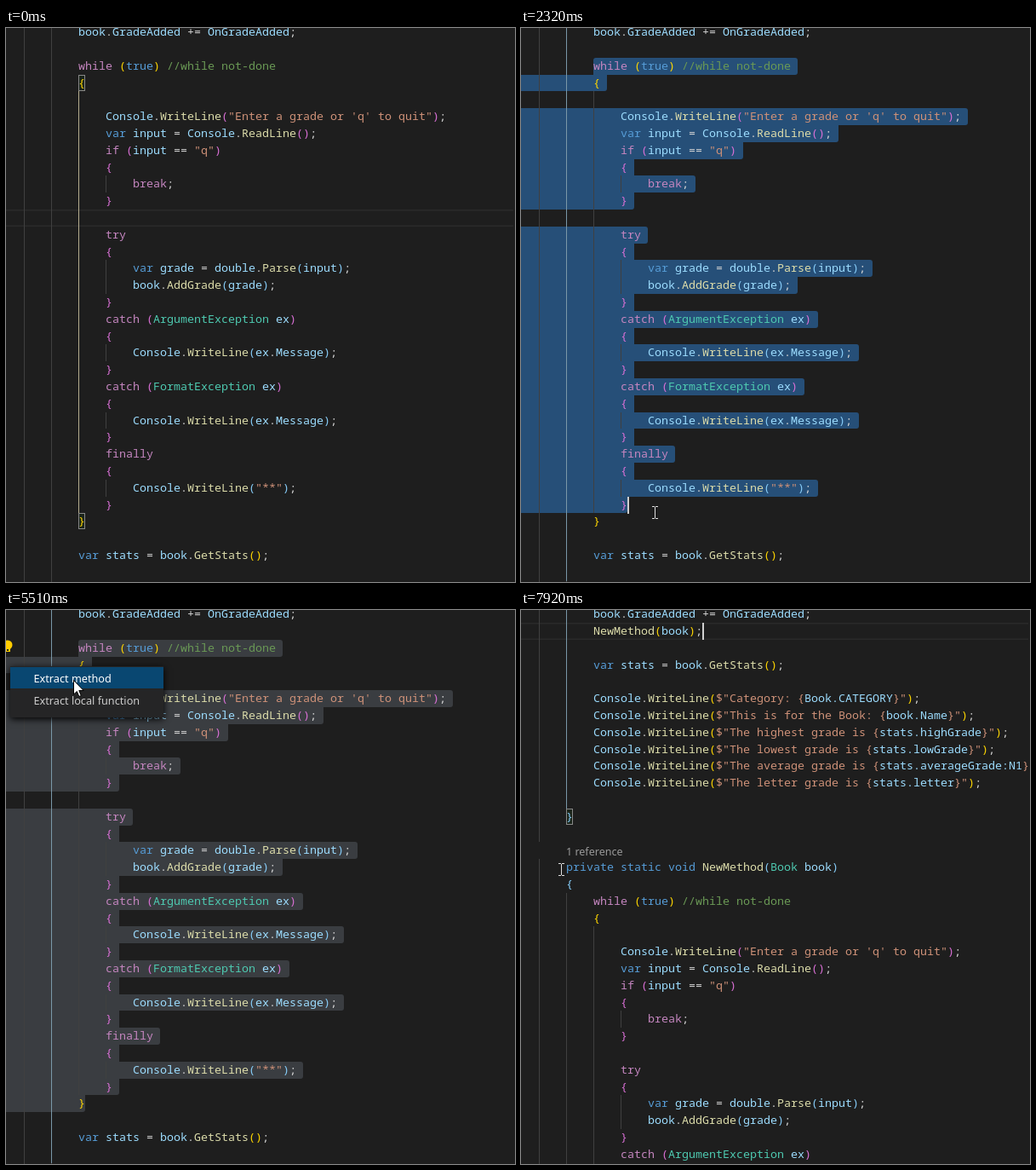
Recreate the animation shown at these times as an HTML page with a canvas. Size 598x650 px, loop 7.99 s.

```html
<!DOCTYPE html>
<html lang="en">
<head>
<meta charset="utf-8">
<title>Extract method</title>
<style>
  html, body { margin: 0; width: 100%; height: 100%; overflow: hidden; background: #1e1e1e; }
  canvas { display: block; }
</style>
</head>
<body>
<canvas id="stage" width="598" height="650"></canvas>
<script>
const ctx = document.getElementById("stage").getContext("2d");
const LOOP = 7990, TICK = 76.76, TICK_ORIGIN = 1530;
const LEFT = 21, CHAR = 8, LINE = 19.8;
const CODE_FONT = '13.333px "Noto Sans Mono", monospace';
const uiFont = size => `${size}px "Noto Sans", sans-serif`;

const loopCode = `        while (true) //while not-done
        {

            Console.WriteLine("Enter a grade or 'q' to quit");
            var input = Console.ReadLine();
            if (input == "q")
            {
                break;
            }

            try
            {
                var grade = double.Parse(input);
                book.AddGrade(grade);
            }
            catch (ArgumentException ex)
            {
                Console.WriteLine(ex.Message);
            }
            catch (FormatException ex)
            {
                Console.WriteLine(ex.Message);
            }
            finally
            {
                Console.WriteLine("**");
            }
        }`.split("\n");
const report = `        var stats = book.GetStats();

        Console.WriteLine($"Category: {Book.CATEGORY}");
        Console.WriteLine($"This is for the Book: {book.Name}");
        Console.WriteLine($"The highest grade is {stats.highGrade}");
        Console.WriteLine($"The lowest grade is {stats.lowGrade}");
        Console.WriteLine($"The average grade is {stats.averageGrade:N1}");
        Console.WriteLine($"The letter grade is {stats.letter}");`.split("\n");
const firstLine = "        book.GradeAdded += OnGradeAdded;";
const upperCode = [firstLine, "        NewMethod(book);", "", ...report, "", "    }", ""];
const methodCode = ["    private static void NewMethod(Book book)", "    {", ...loopCode];

const original = makeDoc([firstLine, "", ...loopCode, "", ...report]);
const extracted = makeDoc([...upperCode, ...methodCode]);
const withLens = makeDoc([...upperCode, null, ...methodCode]);   // null leaves room for the code lens

function wordColor(word, rest) {
  if (/^(while|if|break|try|catch|finally)$/.test(word)) return "#c586c0";
  if (/^(var|true|private|static|void)$/.test(word)) return "#569cd6";
  if (/Exception$/.test(word) || (word === "Book" && rest[0] === " ")) return "#4ec9b0";
  return rest[0] === "(" ? "#dcdcaa" : "#9cdcfe";
}

function makeDoc(lines) {
  const brackets = ["#ffd700", "#da70d6", "#87cefa"];
  let depth = 3;
  const tokens = lines.map(line => {
    const out = [];
    const add = (col, text, color) => out.push({ x: LEFT + col * CHAR, text, color });
    for (const m of (line || "").matchAll(/\/\/.*|\$?"[^"]*"|\w+|[(){}]|[^\s\w(){}"]+/g)) {
      const text = m[0];
      if (text.startsWith("//")) add(m.index, text, "#6a9955");
      else if (/^\$?"/.test(text)) {
        for (const p of text.matchAll(/[^{}]+|[{}]/g))
          add(m.index + p.index, p[0], text[p.index - 1] === "{" ? "#9cdcfe" : "#ce9178");
      }
      else if (/^\w/.test(text)) add(m.index, text, wordColor(text, line.slice(m.index + text.length)));
      else if (/[({]/.test(text)) add(m.index, text, brackets[depth++ % 3]);
      else if (/[)}]/.test(text)) add(m.index, text, brackets[--depth % 3]);
      else add(m.index, text, "#d4d4d4");
    }
    return out;
  });
  // Blank lines take the deeper indent of their neighbours
  const indentNear = (i, step) => {
    while (lines[i] !== undefined && !lines[i]) i += step;
    return lines[i] ? lines[i].search(/\S/) : 0;
  };
  const indents = lines.map((line, i) =>
    line === null ? 0 : Math.max(indentNear(i, -1), indentNear(i, 1)));
  return { lines, tokens, indents };
}

// Pointer path: time, x, y
const path = [
  [70, 331, 489], [610, 61, 58], [730, 61, 58], [1080, 84, 43], [1380, 84, 43],
  [1453, 125, 143], [1530, 139, 183], [1850, 150, 410], [2170, 157, 558], [2290, 157, 568],
  [2400, 157, 568], [2450, 158, 573], [2600, 161, 578], [2900, 161, 578], [2980, 167, 560],
  [3240, 6, 79], [3400, 6, 79], [3560, 5, 44], [4950, 5, 44], [5270, 79, 82],
  [6190, 79, 82], [6519, 272, 274], [6980, 150, 311], [7740, 47, 304], [LOOP, 47, 304]
];
function pointerAt(t) {
  const i = path.findIndex(p => p[0] > t);
  if (i < 1) return { x: path[0][1], y: path[0][2] };
  const [t0, x0, y0] = path[i - 1], [t1, x1, y1] = path[i], k = (t - t0) / (t1 - t0);
  return { x: x0 + (x1 - x0) * k, y: y0 + (y1 - y0) * k };
}

const lineTop = i => Math.round(i * LINE - 4.8);
const endOf = line => LEFT + line.length * CHAR - (line ? 0 : 32);
function rect(color, x, y, w, h) {
  ctx.fillStyle = color;
  ctx.fillRect(x, y, w, h);
}
function label(text, x, y, size, color) {
  ctx.font = uiFont(size);
  ctx.fillStyle = color;
  ctx.fillText(text, x, y);
}

function drawSelection(caret, color) {
  const right = i => i < 2 || i > caret.line ? 0
    : i === caret.line ? caret.x : endOf(original.lines[i]) + CHAR;
  ctx.fillStyle = color;
  for (let i = 2; i <= caret.line; i++) {
    const left = i === 2 ? 85 : 0, r = right(i);
    if (r <= left) continue;
    ctx.beginPath();
    ctx.roundRect(left, lineTop(i), r - left, lineTop(i + 1) - lineTop(i), [
      i === 2 ? 3 : 0, right(i - 1) < r ? 3 : 0, right(i + 1) < r ? 3 : 0, 0]);
    ctx.fill();
  }
}

function drawGuides(doc, active) {
  doc.indents.forEach((indent, i) => {
    for (let col = 0; col < indent; col += 4)
      rect("#404040", LEFT + col * CHAR, lineTop(i), 1, lineTop(i + 1) - lineTop(i));
  });
  const y = lineTop(active.from);
  rect(active.color, LEFT + active.col * CHAR, y, 1, lineTop(active.to) - y);
}

function drawBracketBox(col, line) {
  const x = LEFT + col * CHAR, y = lineTop(line);
  rect("rgba(0,100,0,.1)", x, y, CHAR, 19);
  ctx.strokeStyle = "#888";
  ctx.lineWidth = 1;
  ctx.strokeRect(x + .5, y + .5, CHAR - 1, 18);
}

function drawCode(doc) {
  ctx.font = CODE_FONT;
  doc.tokens.forEach((row, i) => {
    const y = Math.round(i * LINE + 9.2);
    for (const { x, text, color } of row) {
      ctx.fillStyle = color;
      ctx.fillText(text, x, y);
    }
  });
}

function drawBulb() {
  ctx.fillStyle = "#ffcc00";
  ctx.beginPath();
  ctx.arc(2, 41, 5.5, 0, 7);
  ctx.fill();
  rect("#ffcc00", -1, 45, 6, 4);
  rect("#1e1e1e", 1, 46, 2, 2);
}

function drawTooltip() {
  rect("#454545", 4, 68, 135, 24);
  rect("#252526", 5, 69, 133, 22);
  label("Show Fixes. (Ctrl+.)", 12, 84, 12, "#ccc");
}

function drawMenu(alpha) {
  ctx.save();
  ctx.globalAlpha = alpha;
  ctx.shadowColor = "#000";
  ctx.shadowBlur = 8;
  ctx.shadowOffsetY = 2;
  rect("#252526", 5, 66, 180, 60);
  ctx.shadowColor = "transparent";
  rect("#094771", 5, 67, 180, 25);
  label("Extract method", 32.5, 85, 12.7, "#fff");
  label("Extract local function", 32.5, 111, 12.7, "#ccc");
  ctx.restore();
}

function drawPointer({ x, y }, arrow) {
  ctx.save();
  ctx.translate(Math.round(x) + .5, Math.round(y) + .5);
  ctx.lineWidth = 1;
  if (arrow) {
    const shape = new Path2D("M0 0V16.5L3.8 13 6.3 19 8.8 18 6.3 12H11.6Z");
    ctx.fillStyle = "#fff";
    ctx.strokeStyle = "#000";
    ctx.fill(shape);
    ctx.stroke(shape);
  } else {
    ctx.strokeStyle = "#e0e0e0";
    ctx.stroke(new Path2D("M-3.5 -7H-.5M.5 -7H3.5M0 -6.5V6.5M-3.5 7H-.5M.5 7H3.5"));
  }
  ctx.restore();
}

function draw(t) {
  const tick = TICK_ORIGIN + Math.floor((t - TICK_ORIGIN) / TICK) * TICK;
  const done = t >= 5980, selecting = t >= 1390 && !done;
  const menu = t >= 4440 && t < 5910;
  const doc = !done ? original : t < 6200 ? extracted : withLens;

  rect("#1e1e1e", 0, 0, 598, 650);
  if (!selecting) {
    const line = done ? 1 : 11;
    rect("#2a2a2a", 0, lineTop(line), 596, 1.5);
    rect("#2a2a2a", 0, lineTop(line + 1) - 1.5, 596, 1.5);
  }

  // The caret trails the pointer by one tick while dragging
  const caret = { line: 1, x: 213 };
  if (selecting) {
    const p = pointerAt(Math.min(tick, 2610) - TICK);
    caret.line = Math.floor((p.y + 4.8) / LINE);
    const col = Math.max(0, Math.round((p.x - 85) / CHAR));
    caret.x = Math.min(endOf(original.lines[caret.line]), 85 + col * CHAR);
    drawSelection(caret, menu ? "#3a3d41" : "#264f78");
  }

  drawGuides(doc, t < 1390 ? { col: 8, from: 4, to: 29, color: "#b5ad8f" }
    : { col: 4, from: 0, to: done ? 12 : 33, color: "#7a98a8" });
  if (t < 1620) {
    drawBracketBox(8, 3);
    drawBracketBox(8, 29);
  }
  if (t >= 6050) drawBracketBox(4, 12);
  drawCode(doc);
  if (t >= 7300) label("1 reference", 53, 288, 12.5, "#999");

  const blinkStart = t < 5900 ? 2460 : 5910;
  const caretOn = t < blinkStart || Math.floor((t - blinkStart) / 500) % 2 === 0;
  if (t >= 1390 && !menu && caretOn) rect("#d0d0d0", caret.x, lineTop(caret.line), 2, 20);

  if (t >= 2630 && !done) drawBulb();
  if (t >= 3960 && t < 4440) drawTooltip();
  if (menu) drawMenu(t < 4500 ? .4 : t < 4590 ? .85 : 1);
  if (t >= 70) drawPointer(pointerAt(tick), t >= 3500 && t < 6200);
}

function frame() {
  draw(performance.now() % LOOP);
  requestAnimationFrame(frame);
}
frame();
</script>
</body>
</html>
```
